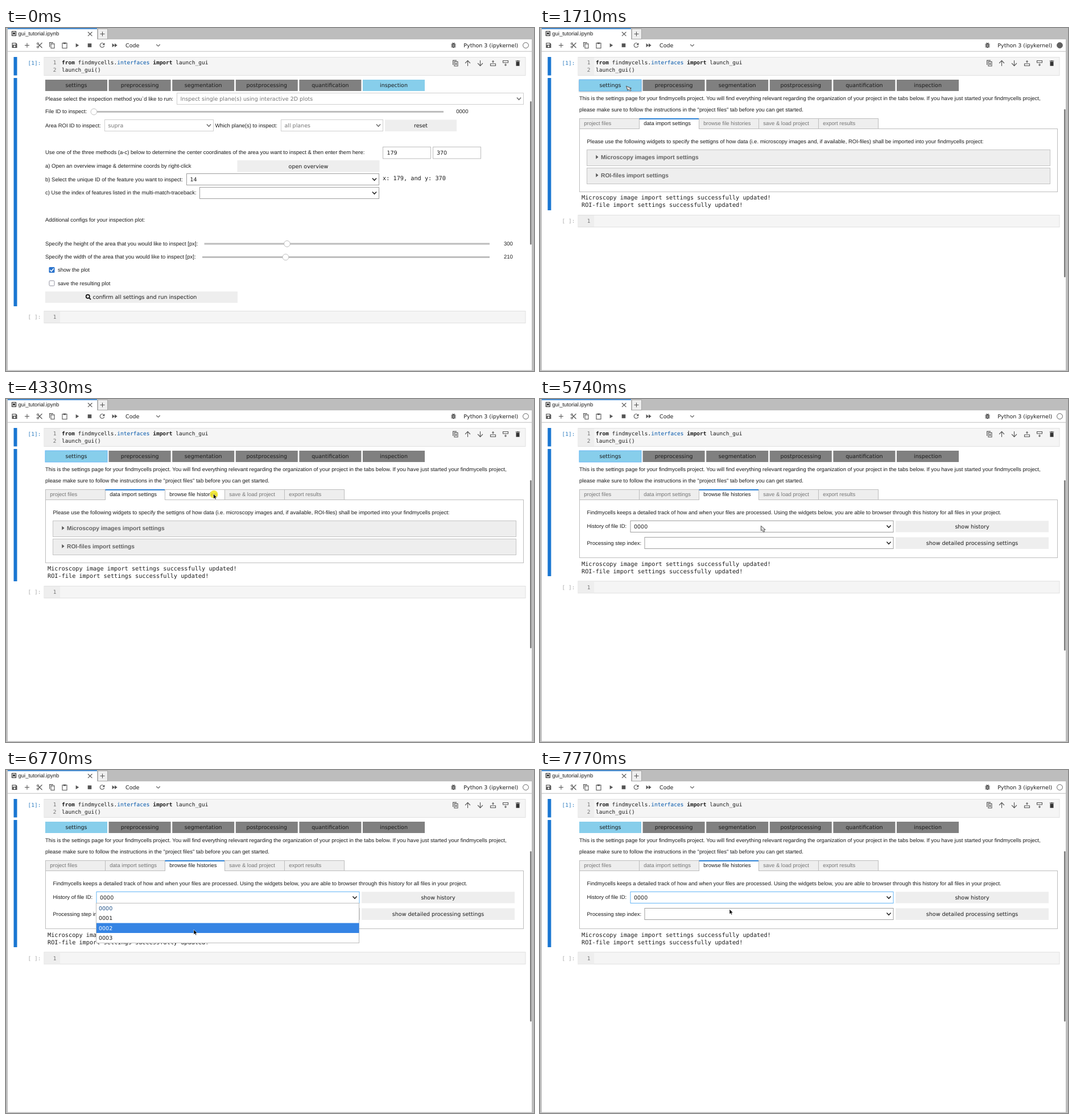
Recreate the animation shown at these times as an HTML page. Size 928 px wide and 604 px high, loop 8 s.

```html
<!DOCTYPE html>
<html lang="en">
<head>
<meta charset="utf-8">
<title>Notebook GUI</title>
<style>
html, body { margin: 0; width: 100%; height: 100%; overflow: hidden; background: #fff; }
svg { display: block; width: 928px; height: 604px; }
text { font: 9.51px "Liberation Sans", Arial, sans-serif; fill: #1c1c1c; text-rendering: geometricPrecision; white-space: pre; }
.ui { font-family: "DejaVu Sans", sans-serif; }
.mono { font-family: "DejaVu Sans Mono", monospace; }
.out { font: 10.24px "DejaVu Sans Mono", monospace; }
.head { font-size: 10.24px; font-weight: bold; fill: #616161; }
.bold { font-weight: bold; }
.dim { fill: #757575; }
.mid { text-anchor: middle; }
.end { text-anchor: end; }
.line { fill: none; stroke: #555; stroke-width: 1.1; }
.solid { fill: #555; }
.dark { fill: #333; }
.hole { fill: #fff; }
.arrow { fill: none; stroke: #222; stroke-width: 1.5; }
</style>
</head>
<body>
<svg id="stage" viewBox="0 0 928 604"></svg>
<script>
const LOOP = 8000;

// Drawing helpers; text is placed by its vertical centre.
const rect = (x, y, w, h, fill, more = '') =>
  `<rect x="${x}" y="${y}" width="${w}" height="${h}" fill="${fill}" ${more}/>`;
const box = (x, y, w, h, fill, stroke, more = '') => rect(x, y, w, h, fill, `stroke="${stroke}" ${more}`);
const text = (x, cy, s, cls = '', more = '') => {
  const size = /out|head/.test(cls) ? 10.24 : 9.51;
  return `<text x="${x}" y="${cy + size * .346}" class="${cls}" ${more}>${s}</text>`;
};
const path = (d, cls = 'line') => `<path d="${d}" class="${cls}"/>`;
const circle = (x, y, r, cls = 'line') => `<circle cx="${x}" cy="${y}" r="${r}" class="${cls}"/>`;
const at = (x, y, body, more = '') => `<g transform="translate(${x} ${y})" ${more}>${body}</g>`;
const group = (id, body) => `<g id="${id}">${body}</g>`;
const button = (x, y, w, h, s) => rect(x, y, w, h, '#eee') + text(x + w / 2, y + h / 2, s, 'ui mid');
const select = (x, y, w, s = '', dim = false, id = '') =>
  box(x, y, w, 20, '#fff', dim ? '#cfcfcf' : '#9e9e9e', id && `id="${id}"`) +
  text(x + 6, y + 10, s, dim ? 'ui dim' : 'ui') +
  at(x + w - 8, y + 10, path('M-3.6-1.9L0 1.8L3.6-1.9', 'arrow'), dim ? 'opacity=".65"' : '');
const slider = (x1, x2, y, knob) =>
  rect(x1, y - 1.5, x2 - x1, 3, '#bdbdbd') +
  `<circle cx="${knob}" cy="${y}" r="5.4" fill="#fff" stroke="#bdbdbd"/>`;
const output = y =>
  text(73, y, 'Microscopy image import settings successfully updated!', 'out') +
  text(73, y + 13.5, 'ROI-file import settings successfully updated!', 'out');
const emptyCell = y =>
  box(67, y + .5, 846, 21, '#f5f5f5', '#e0e0e0') + rect(67.5, y + 1, 27.5, 20, '#eee') +
  text(61.5, y + 11, '[ ]:', 'mono end', 'style="fill:#a8a8a8"') + text(88.5, y + 11, '1', 'mono end dim');
const bar = (y, h) => rect(13.5, y, 6, h, '#1976d2');
const thumb = (y, h) => rect(921, y, 2.6, h, '#7c7c7c', 'rx="1.3"');

const icons = {
  save: path('M-4.5-4.5H2.5L4.5-2.5V4.5H-4.5Z', 'solid') + rect(-3.3, -3.3, 5.2, 2.3, '#fff') + circle(0, 1.8, 1.5, 'hole'),
  plus: path('M-4 0H4M0-4V4'),
  cut: circle(-3, -3, 1.5) + circle(-3, 3, 1.5) + path('M-2-2L4.5 4.5M-2 2L4.5-4.5'),
  copy: path('M-2-2.6H4V5H-2ZM-4.4 3V-4.9H2'),
  paste: path('M-4-4H4V5H-4Z') + rect(-2.2, -5, 4.4, 2.6, '#555'),
  play: path('M-2.3-3.6L3.2 0L-2.3 3.6Z', 'solid'),
  stop: rect(-3.3, -3.3, 6.6, 6.6, '#555'),
  restart: path('M2.9-2.6A3.8 3.8 0 1 0 3.7 .8') + path('M4.4-4.6V-.6H.4Z', 'solid'),
  skip: path('M-4.4-3.4L0 0L-4.4 3.4ZM0-3.4L4.6 0L0 3.4Z', 'solid'),
  chevron: path('M-3.2-1.5L0 1.6L3.2-1.5'),
  bug: path('M-2.6-1A2.6 3 0 0 1 2.6-1V1.5A2.6 3 0 0 1-2.6 1.5Z', 'solid') +
    path('M-4.2-2H4.2M-4.2 .4H4.2M-4.2 2.8H4.2M-2-4.6L-.8-3.2M2-4.6L.8-3.2') + rect(-1.2, -1, 2.4, .9, '#fff') + rect(-1.2, 1.2, 2.4, .9, '#fff'),
  twin: path('M-2-2.6H4V5H-2ZM-4.4 3V-4.9H2M1-.8V3.2M-1 1.2H3'),
  up: path('M0 5V-4.4M-4.4 0L0-4.6L4.4 0'),
  down: path('M0-5V4.4M-4.4 0L0 4.6L4.4 0'),
  above: path('M-4.5 1H4.5V4.5H-4.5ZM0-.4V-5M-2-3H2'),
  below: path('M-4.5-4.5H4.5V-1H-4.5ZM0 .4V5M-2 3H2'),
  trash: path('M-3-2.8H3V4.8H-3ZM-3.8-4.5H-1.5L-1-5H1L1.5-4.5H3.8V-3.4H-3.8Z', 'dark')
};
const iconRow = (y, list) => list.map(([name, x]) => at(x, y, icons[name])).join('');

const frame =
  rect(0, 0, 928, 604, '#fff') +
  rect(0, 0, 928, 20, '#bdbdbd') + rect(0, 0, 3, 604, '#bdbdbd') +
  rect(924, 0, 4, 604, '#bdbdbd') + rect(0, 602.5, 928, 1.5, '#bdbdbd') +
  rect(3, 1, 157, 20, '#fff') + rect(3, .5, 157, 1.5, '#1976d2') +
  box(161.5, 1.5, 17, 18, '#eee', '#a8a8a8') + at(169.5, 10.5, icons.plus) +
  box(10.5, 6, 7, 7.5, 'none', '#333', 'stroke-width="1.2"') + path('M12 8H16V12.4L14 10.6L12 12.4Z', 'dark') +
  text(21.5, 10, 'gui_tutorial.ipynb') + path('M144 7L151.4 14.2M151.4 7L144 14.2') +
  rect(3, 40.7, 921, 1, '#bdbdbd') +
  iconRow(30.5, [['save', 15], ['plus', 37], ['cut', 59], ['copy', 81], ['paste', 103], ['play', 125],
    ['stop', 147], ['restart', 169], ['skip', 191], ['chevron', 267.5], ['bug', 786.5]]) +
  text(210, 30.5, 'Code', 'ui') + text(900.3, 30.5, 'Python 3 (ipykernel)', 'ui end') +
  '<circle id="kernel" cx="913.5" cy="30.5" r="4.9" stroke="#616161"/>' +
  bar(51, 32.5) + box(67, 51.5, 846, 32, '#f5f5f5', '#e0e0e0') + rect(67.5, 52, 27.5, 31, '#eee') +
  text(61.5, 61.5, '[1]:', 'mono end', 'style="fill:#307fc1"') +
  text(88.5, 61, '1', 'mono end dim') + text(88.5, 73.5, '2', 'mono end dim') +
  text(98, 61, '<tspan class="bold">from</tspan> findmycells.<tspan fill="#05a">interfaces</tspan> <tspan class="bold">import</tspan> launch_gui', 'mono') +
  text(98, 73.5, 'launch_gui()', 'mono') +
  iconRow(62, [['twin', 790], ['up', 811.5], ['down', 833.5], ['above', 856], ['below', 878], ['trash', 899.5]]);

const menu = ['settings', 'preprocessing', 'segmentation', 'postprocessing', 'quantification', 'inspection']
  .map((s, i) => {
    const x = 69 + 111.6 * i;
    return `<rect id="${s}" x="${x}" y="91" width="109" height="20"/>` + text(x + 54.5, 101, s, 'ui mid');
  }).join('');

const inspectPage =
  bar(88, 402) + thumb(129, 252.5) +
  text(69, 124.5, 'Please select the inspection method you`d like to run:') +
  select(300.5, 114.5, 609, 'Inspect single plane(s) using interactive 2D plots', true) +
  text(69, 147, 'File ID to inspect:') + slider(150, 769, 147.5, 154.5) + text(791.3, 147, '0000') +
  text(69, 171.5, 'Area ROI ID to inspect:') + select(173.5, 161.5, 191, 'supra', true) +
  text(367.5, 171.5, 'Which plane(s) to inspect:') + select(483.5, 161.5, 179, 'all planes', true) +
  button(666, 161.5, 126, 20.5, 'reset') +
  text(69, 219, 'Use one of the three methods (a-c) below to determine the center coordinates of the area you want to inspect &amp; then enter them here:') +
  box(662.5, 209.5, 84, 20.5, '#fff', '#bdbdbd') + text(669.5, 220, '179', 'ui') +
  box(750.5, 209.5, 84, 20.5, '#fff', '#bdbdbd') + text(757, 220, '370', 'ui') +
  text(69, 242.5, 'a) Open an overview image &amp; determine coords by right-click') + button(406.5, 233, 250, 20.5, 'open overview') +
  text(69, 266.5, 'b) Select the unique ID of the feature you want to inspect:') + select(317.5, 256.5, 338, '14') +
  text(662, 264, 'x: 179, and y: 370', 'out') +
  text(69, 290, 'c) Use the index of features listed in the multi-match-traceback:') + select(340.5, 280.5, 315) +
  text(69, 338, 'Additional configs for your inspection plot:') +
  text(69, 379.5, 'Specify the height of the area that you would like to inspect [px]:') + slider(348.5, 850, 380, 494) + text(875, 379.5, '300') +
  text(69, 403, 'Specify the width of the area that you would like to inspect [px]:') + slider(345, 850, 403.5, 491.5) + text(875, 403, '210') +
  rect(75.5, 421, 10, 10, '#2a73cc', 'rx="1.5"') + '<path d="M77.5 426L79.8 428.5L83.8 423.5" fill="none" stroke="#fff" stroke-width="1.5"/>' +
  text(91, 426, 'show the plot') +
  box(76, 445, 9, 9, '#fff', '#8f8f9d', 'rx="1.5"') + text(91, 450, 'save the resulting plot') +
  rect(69, 464, 338, 20, '#eee') + text(152.5, 474, 'confirm all settings and run inspection', 'ui') +
  '<g fill="none" stroke="#111" stroke-width="1.7"><circle cx="143.8" cy="472.8" r="3.1"/><path d="M146 475L149 478.2"/></g>' +
  emptyCell(498);

const tabNames = ['project files', 'data import settings', 'browse file histories', 'save &amp; load project', 'export results'];
const tabs = (active, bottom) =>
  box(69.5, 177.5, 840, bottom - 177.5, '#fff', '#bdbdbd') +
  tabNames.map((s, i) => {
    const x = 69.5 + 105 * i, on = i === active;
    return box(x, 159.5, 105, 18, on ? '#fff' : '#eee', '#bdbdbd', on ? '' : `id="tab${active}${i}"`) +
      (on ? rect(x, 159, 105, 1.8, '#1976d2') + rect(x + .5, 176.5, 104, 2, '#fff') : '') +
      text(x + 7.7, 168, s, on ? '' : 'dim', `id="label${active}${i}"`);
  }).join('');
const accordion = (y, s) =>
  box(82.5, y, 814, 28, '#eee', '#c4c4c4') + path(`M98.3 ${y + 9.3}L102.5 ${y + 12.8}L98.3 ${y + 16.3}Z`, 'solid') + text(107, y + 13.2, s, 'head');

const intro =
  text(69, 123.5, 'This is the settings page for your findmycells project. You will find everything relevant regarding the organization of your project in the tabs below. If you have just started your findmycells project,') +
  text(69, 144, 'please make sure to follow the instructions in the "project files" tab before you can get started.');

const importPage =
  bar(88, 233) + thumb(143, 296) + intro + tabs(1, 288.5) +
  text(82.5, 200, 'Please use the following widgets to specify the settigns of how data (i.e. microscopy images and, if available, ROI-files) shall be imported into your findmycells project:') +
  accordion(214.5, 'Microscopy images import settings') + accordion(246.5, 'ROI-files import settings') +
  output(298) + emptyCell(329);

const historyPage =
  bar(88, 224) + thumb(143, 300) + intro + tabs(2, 279.5) +
  text(82.5, 200, 'Findmycells keeps a detailed track of how and when your files are processed. Using the widgets below, you are able to browser through this history for all files in your project.') +
  text(82.5, 224, 'History of file ID:') + select(159, 214.5, 462, '0000', false, 'fileBox') + button(625, 214.5, 269, 20, 'show history') +
  text(82.5, 253.5, 'Processing step index:') + select(184, 243.5, 437) + button(625, 243.5, 269, 20.5, 'show detailed processing settings') +
  output(290) + emptyCell(320.3);

const ROW = 17.5, LIST_TOP = 234.5;
const list = box(158.5, LIST_TOP, 462, ROW * 4, '#fff', '#bdbdbd') +
  `<rect id="hover" x="159" width="461.5" height="${ROW}" fill="#3584e4"/>` +
  [0, 1, 2, 3].map(i => text(163, LIST_TOP + ROW * (i + .5), '000' + i, 'ui', `id="option${i}"`)).join('');

const pointer =
  '<circle id="click" cx="1" cy="1" r="7" fill="#f0e51f" opacity=".85"/>' +
  '<path id="arrow" d="M0 0V8.8L2 7L3.3 10L4.8 9.3L3.5 6.4H6.2Z" fill="#000" stroke="#fff" stroke-width=".6"/>' +
  '<path id="pressed" d="M.4 .4V9L2.5 7.4L4.5 11.4L6.6 10.7L5.4 7.2H8.2Z" fill="#ddd" stroke="#444" stroke-width=".9"/>';

const stage = document.getElementById('stage');
stage.innerHTML = frame + group('page0', inspectPage) + group('page1', importPage) + group('page2', historyPage) +
  menu + group('list', list) + group('pointer', pointer);

const el = id => document.getElementById(id);
const show = (id, on) => el(id).style.display = on ? '' : 'none';
const set = (id, name, value) => el(id).setAttribute(name, value);
const during = (t, a, b) => t >= a && t < b;

// Pointer moves: first step, last step, number of steps, end point.
const moves = [
  [190, 910, 8, 155, 109], [1010, 1110, 2, 151, 102],
  [2530, 3330, 9, 247, 170], [3430, 3830, 5, 364.5, 167],
  [5140, 5440, 4, 387, 222], [5740, 5740, 1, 388, 223],
  [6040, 6360, 4, 332, 277], [6460, 6770, 4, 330, 281],
  [6860, 7170, 4, 332, 248], [7270, 7570, 4, 332, 244], [7670, 7770, 2, 333, 245]
];

function pointerAt(t) {
  let x = 990, y = 58;
  for (const [t0, t1, n, toX, toY] of moves) {
    if (t < t0) break;
    const step = n > 1 ? Math.floor((t - t0 + 4) / ((t1 - t0) / (n - 1))) + 1 : 1;
    const k = Math.min(step / n, 1), ease = n > 2 ? k * (1.4 - .4 * k) : k;
    x += (toX - x) * ease;
    y += (toY - y) * ease;
  }
  return [x, y];
}

function draw(t) {
  const page = t < 1510 ? 0 : t < 4530 ? 1 : 2;
  for (let i = 0; i < 3; i++) show('page' + i, i === page);
  set('kernel', 'fill', during(t, 1510, 1810) ? '#616161' : '#fff');

  const [x, y] = pointerAt(t);
  for (const s of ['settings', 'preprocessing', 'segmentation', 'postprocessing', 'quantification', 'inspection'])
    set(s, 'fill', s === (page ? 'settings' : 'inspection') ? '#87ceeb' : '#808080');
  set('settings', 'stroke', during(t, 1410, 5840) ? '#64b5f6' : 'none');
  el('settings').style.filter = during(t, 1010, 2730) ? 'drop-shadow(0 1px 1px rgba(0,0,0,.25))' : '';

  const overTab = page === 1 && x > 280;
  set('tab12', 'fill', overTab ? '#fff' : '#eee');
  set('label12', 'class', overTab ? '' : 'dim');

  set('fileBox', 'stroke', t >= 5840 ? '#64b5f6' : '#9e9e9e');
  show('list', during(t, 5840, 7670));
  // The highlighted row trails the pointer slightly.
  const trail = t < 6860 ? y : pointerAt(t - 104)[1];
  const row = Math.max(0, Math.min(3, Math.floor((trail - LIST_TOP) / ROW)));
  set('hover', 'y', LIST_TOP + ROW * row);
  for (let i = 0; i < 4; i++)
    el('option' + i).style.fill = i === row ? '#fff' : i ? '#1c1c1c' : '#1d4f86';

  const early = during(t, 1510, 1810), pressed = early || during(t, 5740, 5840);
  show('pointer', t >= 190);
  set('pointer', 'transform', `translate(${x} ${y})`);
  show('pressed', pressed);
  show('arrow', !pressed);
  show('click', during(t, 1410, 1510) || during(t, 4330, 4530));
  set('pressed', 'transform', early ? 'rotate(-18) scale(.95)' : '');
}

function tick() {
  draw(performance.now() % LOOP);
  requestAnimationFrame(tick);
}
tick();
</script>
</body>
</html>
```
